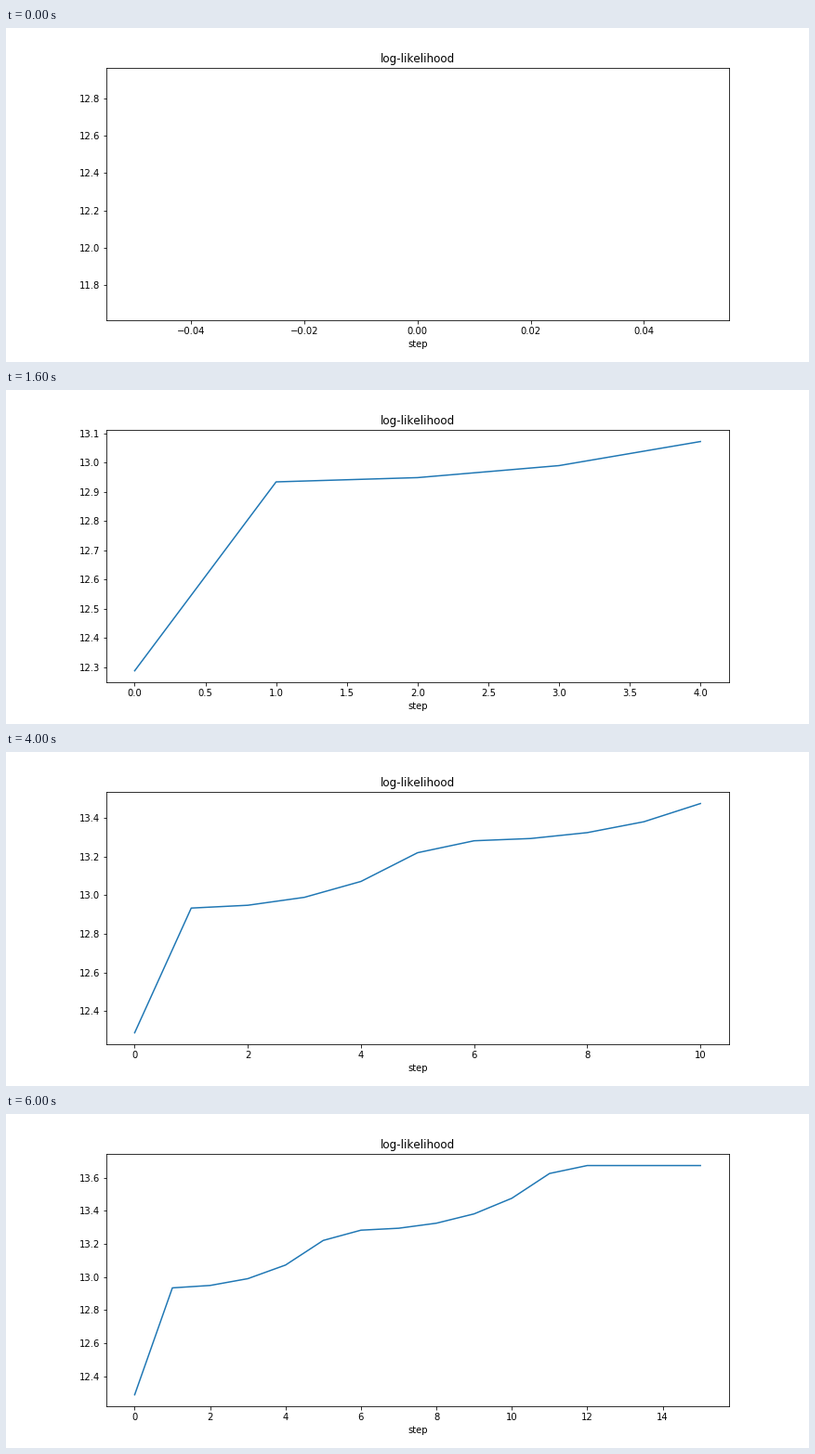
These frames come from a looping animation (864 px wide and 360 px high, 6400 ms). A matplotlib script:

```python
import numpy as np
import matplotlib.pyplot as plt
from matplotlib.animation import FuncAnimation

plt.rcParams.update({"font.family": "DejaVu Sans", "font.size": 10,
                     "text.kerning_factor": 6})

STEPS = 16
# Turning points of the curve: it climbs between them and stays flat at the end.
KEY_STEPS = np.array([0, 1, 5, 6, 11, 12])
KEY_SCORES = np.array([12.2872, 12.934, 13.221, 13.283, 13.626, 13.674])


def climb(t):
    """Ease from 0 to 1 with a slow start and a growing slope."""
    return t ** 1.5 * np.exp(1.2 * (t - 1))


def score(step):
    part = np.clip((step - KEY_STEPS[:-1]) / np.diff(KEY_STEPS), 0, 1)
    return KEY_SCORES[0] + np.sum(np.diff(KEY_SCORES) * climb(part))


scores = [score(step) for step in range(STEPS)]

fig, ax = plt.subplots(figsize=(12, 5), dpi=72, facecolor="white")
fig.subplots_adjust(left=0.125, right=0.9, bottom=0.125, top=0.88)
ax.set_title("log-likelihood")
ax.set_xlabel("step")
line, = ax.plot([], [], color="#1f77b4", lw=1.5)


def update(step):
    """Show the scores up to this step and refit both axes."""
    count = step + 1
    line.set_data(range(count), scores[:count])
    ax.relim()
    ax.autoscale()
    return line,


anim = FuncAnimation(fig, update, frames=STEPS, interval=400,
                     init_func=lambda: update(0), repeat=True, repeat_delay=0)
plt.show()
```
